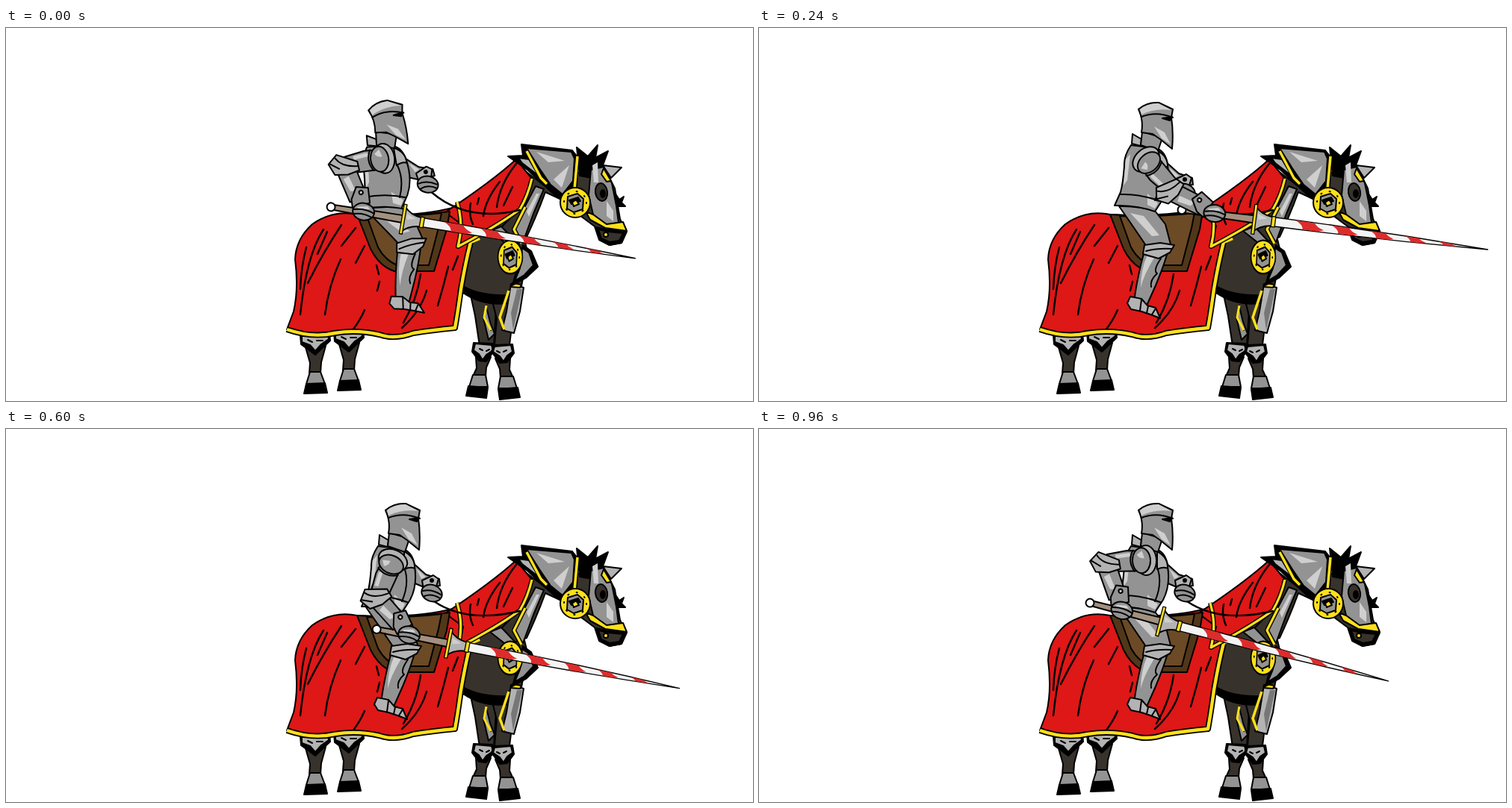
Animation, 1000 px wide and 500 px high, one loop 1.56 s. Source, as an HTML page:

```html
<!DOCTYPE html>
<html lang="en">
<head>
<meta charset="utf-8">
<title>Knight with lance</title>
<style>
  html, body { margin: 0; width: 100%; height: 100%; overflow: hidden; background: #fff; }
  svg { display: block; width: 1000px; height: 500px; }
  path, ellipse, circle { stroke: #000; stroke-width: 2; stroke-linejoin: round; }
  .steel { fill: #939393; }
  .light { fill: #b3b3b3; }
  .shine { fill: #cfcfcf; stroke: none; }
  .shade { fill: #777; stroke: none; }
  .hide { fill: #37322c; }
  .black { fill: #000; }
  .red { fill: #de1717; }
  .gold { fill: #ffe01b; }
  .line { fill: none; stroke-linecap: round; }
  .fold { stroke-width: 2.4; }
  .rim { fill: none; stroke-width: 8; }
  .trim { fill: none; stroke: #ffe01b; stroke-width: 4.4; }
  .thin .rim { stroke-width: 6; }
  .thin .trim { stroke-width: 3.2; }
</style>
</head>
<body>
<svg viewBox="0 0 1000 500">
  <defs>
    <g id="hind">
      <path class="hide" d="M401 428L428 426 422 448 421 463 406 463 407 449Z"/>
      <path class="steel" d="M407 461H421L427 477H402Z" stroke="none"/>
      <path class="black" d="M402 477L427 476 430 489 399 490Z"/>
      <path class="black" d="M394 412L433 408 434 419 414 438 395 424Z"/>
      <path class="light" d="M396 413L431 409 432 417 422 424 414 433 407 425 396 421Z"/>
      <path class="line" d="M404 418L410 421M416 419L424 419"/>
    </g>
    <g id="fore-leg">
      <path class="hide" d="M629 441L649 441 643 455 642 467 625 467 630 456Z"/>
      <path class="steel" d="M625 465H642L645 481H620Z" stroke="none"/>
      <path class="black" d="M619 480L645 482 643 496 616 493Z"/>
      <path class="black" d="M626 422L651 423 654 432 643 447 633 446 624 434Z"/>
      <path class="light" d="M628 423L650 425 652 432 643 438 638 445 633 437 626 432Z"/>
      <path class="line" d="M634 430L638 432M643 433L647 431"/>
    </g>
    <g id="medal">
      <circle class="gold" r="20"/>
      <circle class="line" r="15" stroke-width="3" stroke-dasharray="1 11"/>
      <path class="steel" d="M-10 -8L3 -12 11 -5 10 9 -2 13 -11 8Z"/>
      <path class="black" d="M-8 -3L4 -7 7 -2 -5 2Z" stroke="none"/>
      <path class="gold" d="M-4 0L1 -4 5 2 -2 5Z"/>
    </g>
  </defs>

  <!-- horse -->
  <use href="#hind"/>
  <use href="#hind" x="45" y="-4"/>
  <path class="hide" d="M622 358L657 364 653 426 634 426 628 386Z"/>
  <path class="hide" d="M650 362L682 360 674 425 654 425 657 390Z"/>
  <path class="steel" d="M643 374L648 394 654 410 646 418 639 388Z"/>
  <path class="line" d="M643 372L640 388 649 405" stroke-width="6"/>
  <path class="trim" d="M643 372L640 388 649 405" style="stroke-width:3"/>
  <use href="#fore-leg"/>
  <use href="#fore-leg" transform="translate(1304 2) scale(-1 1)"/>
  <path class="hide" d="M612 355Q612 310 622 288Q650 255 688 258L698 300 688 358Q650 372 612 355Z"/>
  <path class="black" d="M612 346Q640 362 688 357L684 367Q642 376 612 355Z"/>
  <path class="light" d="M676 343L693 348 688 380 680 409 664 405 670 380Z" stroke-width="2.5"/>
  <path class="shade" d="M684 350L691 350 679 405 676 382Z"/>
  <path class="line" d="M673 352L661 388 667 404" stroke-width="6"/>
  <path class="trim" d="M673 352L661 388 667 404" style="stroke-width:3.5"/>
  <path class="gold" d="M678 342L690 344 688 348 676 347Z"/>

  <path class="hide" d="M698 194L748 232 722 220Q712 248 697 280L676 288 660 270 690 240Z"/>
  <path class="steel" d="M709 212L720 216 706 249 692 287 679 272 688 252Z"/>
  <path class="shine" d="M710 222L714 222 700 253 697 246Z"/>
  <path class="steel" d="M648 272L663 266 682 286 672 291Z"/>
  <g class="thin">
    <path class="rim" d="M695 240L680 270 690 289"/><path class="trim" d="M695 240L680 270 690 289"/>
  </g>
  <path class="black" d="M692 291L703 299 712 320 696 335 678 345 684 323Z"/>
  <path class="steel" d="M691 295L700 301 706 318 694 331 681 339 688 322Z"/>
  <use href="#medal" transform="translate(675 307) scale(.82 1.12)"/>

  <path class="red" d="M470 250Q438 243 410 263Q388 283 387 310Q392 350 385 380L376 404Q410 416 440 409Q470 404 500 411Q520 418 545 409Q570 405 601 402Q605 380 609 350Q615 315 622 287L602 240Q550 254 470 250Z"/>
  <path class="red" d="M588 247Q650 206 683 176L704 202Q700 226 688 243Q662 262 606 293L612 265Z"/>
  <path class="line fold" d="M425 270Q402 305 394 384M449 264Q425 300 404 342M402 294Q395 320 394 350M448 310Q432 345 427 384M468 268L449 292M480 378Q474 392 464 405M496 318L499 330M555 330Q550 365 532 395M592 320Q586 345 578 372M605 306L598 324M500 340L497 352M563 352Q555 380 530 402M430 273L417 303M480 292L468 315"/>
  <path class="line fold" d="M683 182Q661 209 657 240M661 206Q642 230 639 252M633 228L631 236M678 213L666 238M622 235Q619 250 625 263"/>
  <path class="rim" d="M376 404Q410 416 440 409Q470 404 500 411Q520 418 545 409Q570 405 601 402Q605 380 609 350Q615 315 622 287"/>
  <path class="trim" d="M376 404Q410 416 440 409Q470 404 500 411Q520 418 545 409Q570 405 601 402Q605 380 609 350Q615 315 622 287L634 282"/>
  <g class="thin">
    <path class="rim" d="M604 233Q613 263 605 293Q660 264 688 243Q699 224 704 202"/>
    <path class="trim" d="M604 233Q613 263 605 293Q660 264 688 243Q699 224 704 202"/>
  </g>

  <!-- horse head -->
  <path class="hide" d="M762 195L800 185 815 215 822 256 830 274 824 288 808 291 794 284 788 266 764 248Z"/>
  <path class="black" d="M672 172L692 171 690 156 758 164 766 174 764 212 744 230 738 227 715 206 698 190Z"/>
  <path class="steel" d="M697 161L757 166 761 175 759 205 745 223 729 210 714 188Z"/>
  <path class="shine" d="M710 166L748 178 726 180Z M733 203L754 184 744 214Z"/>
  <path class="light" d="M686 174L700 176 713 198 691 181Z" stroke="none"/>
  <path class="trim" d="M697 165L716 201 724 209" style="stroke-width:3.5"/>
  <path class="black" d="M764 160L779 172 792 157 789 174 806 165 799 184 790 202 768 198Z"/>
  <path class="light" d="M799 184L824 187 810 201Z"/>
  <path class="steel" d="M783 190L800 186 811 208 817 238 820 261 803 264 786 250 780 224Z"/>
  <path class="shine" d="M785 184L792 180 793 207 787 207Z M804 232L813 245 813 259 804 252Z"/>
  <path class="gold" d="M800 188L810 205 804 206 797 196Z"/>
  <path class="black" d="M815 221L821 230 827 226 824 234 829 239 818 239Z"/>
  <ellipse class="hide" cx="797" cy="220" rx="8" ry="12" transform="rotate(-8 797 220)"/>
  <ellipse class="black" cx="799" cy="222" rx="3" ry="5"/>
  <path class="line" d="M765 172L761 216" stroke-width="6"/>
  <path class="trim" d="M765 172L761 216" style="stroke-width:3.5"/>
  <path class="gold" d="M776 246L786 250 804 263 826 260 831 272 802 268 782 257Z"/>
  <path class="black" d="M790 267L804 270 831 273 824 288 808 291 795 284Z"/>
  <path class="hide" d="M793 270L806 273 826 275 821 285 808 287 797 282Z" stroke="none"/>
  <circle class="gold" cx="803" cy="277" r="3" stroke="none"/>
  <use href="#medal" x="762" y="234"/>

  <!-- saddle -->
  <path d="M470 250Q530 254 594 246L590 270 573 326 520 326Q500 320 488 296Z" fill="#513719" stroke-width="2.2"/>
  <path d="M483 252Q530 254 583 248L579 268 566 318 524 318Q508 312 498 294Z" fill="#6c4a26"/>
  <path id="rein" class="line fold"/>

  <!-- rider -->
  <g id="rider">
    <path class="steel" d="M543 178L562 195 580 201 581 210 562 213 545 206Z"/>
    <path class="shine" d="M549 187L562 198 556 201Z"/>
    <path class="light" d="M557 203L572 196 579 201 576 211 559 216Z"/>
    <ellipse class="steel" cx="570" cy="220" rx="14" ry="11" transform="rotate(20 570 220)"/>
    <path class="line" d="M558 217Q570 214 582 222M560 224Q570 220 581 227"/>
    <circle class="black" cx="570" cy="203" r="2"/>

    <path class="steel" d="M482 239Q505 238 530 245L544 263 551 290 521 296Q507 275 482 239Z"/>
    <path class="shine" d="M497 248L515 252 536 278 526 279Z"/>
    <path class="steel" d="M516 299L546 304Q541 321 531 345L519 372 502 366Q507 330 516 299Z"/>
    <path class="shine" d="M519 306L529 308Q515 331 511 348Q511 325 519 306Z"/>
    <path class="line" d="M538 309Q527 325 533 329Q523 338 525 347"/>
    <path class="light" d="M516 291L537 288 556 291 550 301 535 309 514 303Z"/>
    <path class="line" d="M518 299Q534 295 552 296"/>
    <path class="light" d="M497 360L512 363 520 372 531 375 537 389 524 384 512 380 498 377 493 369Z"/>
    <path class="line" d="M512 364L510 379M521 373L519 382M531 376L526 384"/>

    <path class="steel" d="M498 157Q488 172 489 185Q487 210 484 220L476 238Q505 237 530 246L541 229Q551 210 547 184Q545 166 532 161Z"/>
    <path class="light" d="M533 164Q548 172 547 187Q542 184 533 188Z"/>
    <path class="shine" d="M491 176L497 169 493 204 488 211Z M520 222L534 235 530 242 520 237Z"/>
    <path class="line" d="M534 188Q540 208 530 231M484 223Q510 222 537 232"/>
    <path class="light" d="M500 142L512 149 511 158 499 155Z"/>
    <path class="steel" d="M513 139L540 147 534 165 511 157Z"/>
    <path class="steel" d="M508 109Q519 99 535 100L554 109 552 120Q555 140 553 162L537 149 527 142 512 140Q515 124 508 109Z"/>
    <path class="shine" d="M510 109Q520 101 535 101L552 110Q530 107 512 116Z"/>
    <path class="shine" d="M529 132L543 140 551 156 539 148Z"/>
    <path class="line" d="M512 119Q532 111 554 120"/>
    <path class="black" d="M540 121L553 119 550 124Z" stroke="none"/>
  </g>

  <!-- lance, measured from the gripping hand -->
  <g id="lance">
    <path d="M-40 -3.5L54 -5V5L-40 3.5Z" fill="#a3907f"/>
    <circle cx="-43" r="5.5" fill="#fff"/>
    <path class="light" d="M55 -17Q64 -7 79 -6V6Q64 7 55 17Z"/>
    <path class="shine" d="M59 -8L72 -3 60 0Z"/>
    <path class="gold" d="M53 -20H57V20H53Z" style="stroke-width:1.3"/>
    <path d="M81 -6Q225.5 -6 370 0Q225.5 6 81 6Z" fill="#f3f3f3" style="stroke-width:1.4"/>
    <path id="stripes" fill="#dd2c2c" style="stroke:none"/>
    <path class="gold" d="M78 -7H83V7H78Z" style="stroke-width:1.3"/>
  </g>

  <g id="upper">
    <ellipse class="light" rx="14" ry="20"/>
    <path class="steel" d="M0 12L25 14 52 10 48 -13 0 -14Z"/>
    <path class="shine" d="M19 6L40 4 41 9 22 11Z"/>
    <ellipse class="steel" cx="6" rx="12" ry="17"/>
    <path class="shine" d="M2 3Q8 2 12 8L5 13Z"/>
    <path class="line" d="M16 -14Q25 0 17 14"/>
  </g>
  <g id="fore">
    <path class="steel" d="M8 16L50 12 48 -12 8 -9Z"/>
    <path class="shine" d="M16 3L38 0 36 7 18 11Z"/>
    <path class="light" d="M-16 10L-7 24 9 20 14 3 13 -13 1 -14Z"/>
    <path class="line" d="M-12 13Q2 8 7 -13M-7 22L3 12"/>
    <path class="steel" d="M33 -2L39 -17 59 -13 58 11 47 9Z"/>
    <circle class="shine" cx="42" cy="-6" r="2.6" style="stroke:#000"/>
  </g>
  <g id="fist">
    <ellipse class="steel" rx="14.5" ry="11.5" cx="1" cy="-1"/>
    <path class="shine" d="M-9 -6L5 -9 9 -6 -5 -3Z"/>
    <path class="line" d="M-12 -2Q2 -6 15 -1M-12 4Q2 0 13 5"/>
  </g>
</svg>
<script>
const el = id => document.getElementById(id);
const LOOP = 1560, STEP = 40, REST = 960;
const HIP = [505, 247], SHOULDER = [518, 176], REIN_HAND = [573, 231];
const UPPER = 50, FORE = 68;

// time, upper arm angle, forearm angle, lance angle
const keys = [
  [0, 171.4, 72.2, 9.6],
  [160, 57.1, 31.4, 10.2],
  [200, 42, 29, 7],
  [REST, 177.7, 75.9, 14.7]
];

function pose(t) {
  const i = Math.max(1, keys.findIndex(k => k[0] >= t));
  const a = keys[i - 1], b = keys[i], p = (t - a[0]) / (b[0] - a[0]);
  return a.map((v, n) => v + (b[n] - v) * p);
}

function polar([x, y], angle, r) {
  const a = angle * Math.PI / 180;
  return [x + r * Math.cos(a), y + r * Math.sin(a)];
}

function aroundHip([x, y], angle) {
  const dx = x - HIP[0], dy = y - HIP[1];
  return polar(HIP, Math.atan2(dy, dx) * 180 / Math.PI + angle, Math.hypot(dx, dy));
}

function place(id, [x, y], angle) {
  el(id).setAttribute('transform', `translate(${x} ${y}) rotate(${angle})`);
}

// half the shaft's thickness at a distance from the hand
const half = x => 5.6 * (1 - ((x - 81) / 289) ** 2);

function stripe(x) {
  const w = 39 - (x - 110) * .07;
  const at = (part, side) => `${x + w * part} ${side * half(x + w * part)}`;
  return `M${at(0, -1)}L${at(.66, -1)}Q${at(.74, 0)} ${at(1, .5)}` +
    `L${at(.8, 1)} ${at(.26, 1)}Q${at(.3, 0)} ${at(0, -1)}Z`;
}
el('stripes').setAttribute('d', [110, 159, 211, 258, 303].map(stripe).join(''));

function draw(now) {
  const t = Math.min(REST, Math.floor(now % LOOP / STEP) * STEP);
  const [, upper, fore, lance] = pose(t);
  const lean = -9.5 * Math.max(0, 1 - t / 200);
  const shoulder = aroundHip(SHOULDER, lean);
  const elbow = polar(shoulder, upper, UPPER);
  const hand = polar(elbow, fore, FORE);
  el('rider').setAttribute('transform', `rotate(${lean} ${HIP})`);
  el('rein').setAttribute('d', `M${aroundHip(REIN_HAND, lean)}Q617 261 688 244`);
  place('upper', shoulder, upper);
  place('fore', elbow, fore);
  place('lance', hand, lance);
  place('fist', hand, lance);
}

const start = performance.now();
function tick() {
  draw(performance.now() - start);
  requestAnimationFrame(tick);
}
tick();
</script>
</body>
</html>
```
